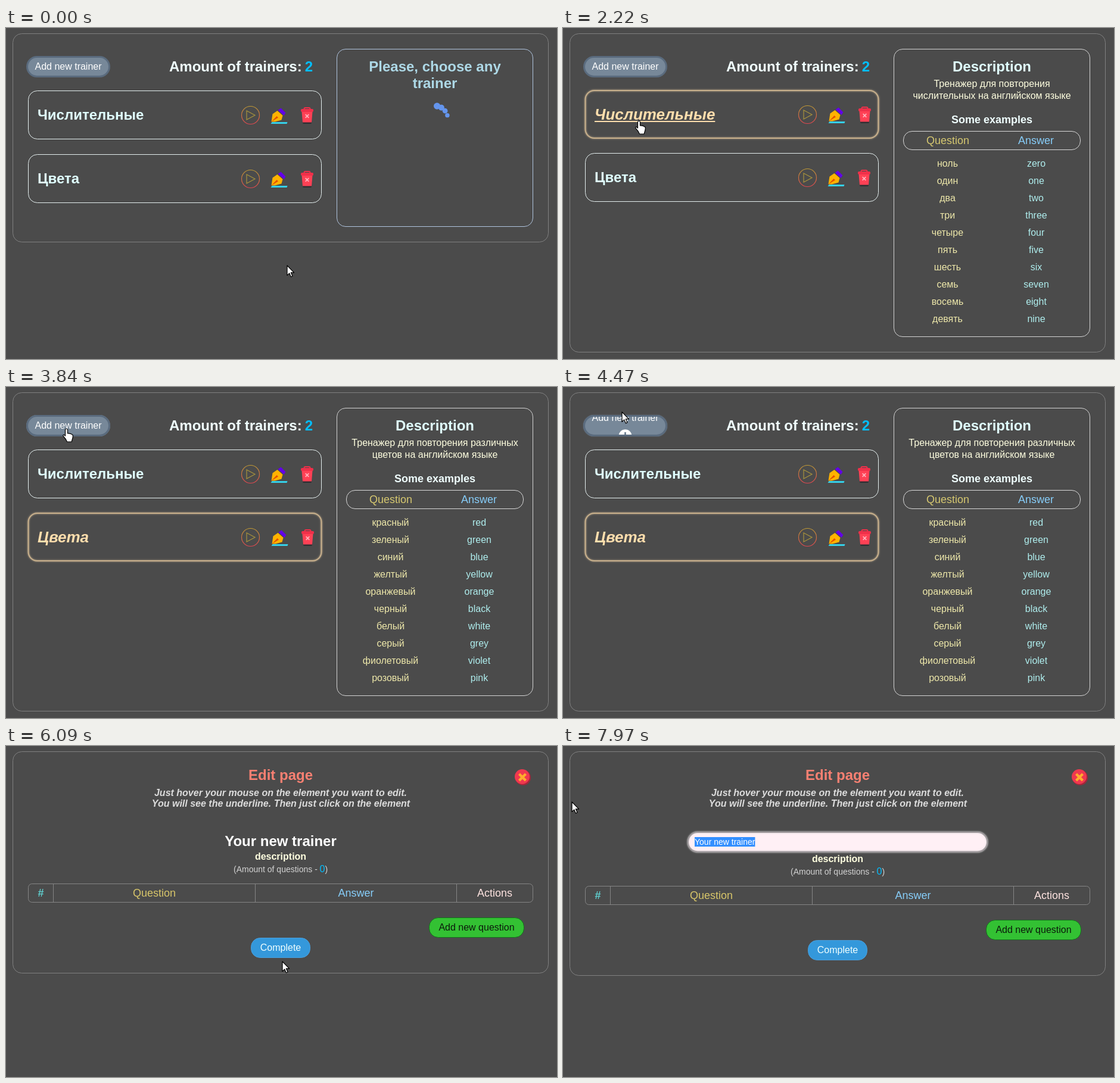
Write an HTML page with a canvas that moves like this. It is 925 px wide and 556 px high and loops after 8 s.

```html
<!DOCTYPE html>
<html lang="en">
<head>
<meta charset="utf-8">
<title>Trainers</title>
<style>
html, body { margin: 0; width: 100%; height: 100%; overflow: hidden; background: #4b4b4b; }
canvas { display: block; }
</style>
</head>
<body>
<canvas id="stage" width="925" height="556"></canvas>
<script>
const g = document.getElementById('stage').getContext('2d');
const LOOP = 8000, STEP = 1000 / 12, TAU = Math.PI * 2;
const CLICK = { first: 2040, second: 3310, add: 4840, edit: 6090, rename: 7240 };

// Pointer moves; it rests between them
const START = { x: 472, y: 399 };
const MOVES = [
  { from: 0, to: 840, x: 461, y: 397 },
  { from: 840, to: 1583, x: 285, y: 341 },
  { from: 1583, to: 2000, x: 127, y: 156 },
  { from: 2400, to: 2833, x: 112, y: 232 },
  { from: 3480, to: 3833, x: 101, y: 70 },
  { from: 3833, to: 4083, x: 98, y: 28 },
  { from: 4250, to: 4640, x: 101, y: 62 },
  { from: 5000, to: 5167, x: 187, y: 182 },
  { from: 5167, to: 5800, x: 464, y: 362 },
  { from: 6083, to: 6800, x: 469, y: 165 },
  { from: 7240, to: 7900, x: 15, y: 94 }
];

const TOPICS = [
  { about: ['Тренажер для повторения', 'числительных на английском языке'],
    ask: 'ноль один два три четыре пять шесть семь восемь девять',
    reply: 'zero one two three four five six seven eight nine' },
  { about: ['Тренажер для повторения различных', 'цветов на английском языке'],
    ask: 'красный зеленый синий желтый оранжевый черный белый серый фиолетовый розовый',
    reply: 'red green blue yellow orange black white grey violet pink' }
];
const TITLES = ['Числительные', 'Цвета', 'Your new trainer'];

const ARROW = new Path2D('M0 0v16.5l3.8-3.6 2.6 6 2.6-1.2-2.6-5.8h5.2z');
const HAND = new Path2D('M-1.5 1.5q2-3 4 0v6.5q4-.5 8 2 1.3 1 .6 5l-2 7h-7.6q-2-5-6.4-9.5-.8-2 1-2.4l2.4 2z');
const BEAM = new Path2D('M-3-8q3 0 3 2 0-2 3-2M0-6v12M-3 8q3 0 3-2 0 2 3 2');

const clamp = v => Math.min(1, Math.max(0, v));
const soften = u => (u + u * u * (3 - 2 * u)) / 2;

function pointerAt(t) {
  let { x, y } = START;
  for (const m of MOVES) {
    const f = soften(clamp((t - m.from) / (m.to - m.from)));
    x += (m.x - x) * f;
    y += (m.y - y) * f;
  }
  return [x, y];
}

// How far the button label has rolled to the plus
function rollAt(t) {
  const hover = (enter, leave) => clamp((t - enter) / 300) - clamp((t - leave) / 300);
  return hover(3833, 3960) + hover(4290, 5080);
}

function font(size, style = '') {
  g.font = `${style} ${size}px "Liberation Sans", Arial, sans-serif`;
}

function text(str, x, y, size, color, style = '', align = 'center') {
  font(size, style);
  g.textAlign = align;
  g.fillStyle = color;
  g.fillText(str, x, y);
}

function underline(str, x, y) {
  g.fillRect(x, y, g.measureText(str).width, 2);
}

function box(x, y, r, b, radius, stroke, fill, width = 1) {
  g.beginPath();
  g.roundRect(x, y, r - x, b - y, radius);
  if (fill) { g.fillStyle = fill; g.fill(); }
  if (stroke) { g.strokeStyle = stroke; g.lineWidth = width; g.stroke(); }
}

function shape(path, color) {
  g.fillStyle = color;
  g.fill(new Path2D(path));
}

function disc(x, y, r, color) {
  g.fillStyle = color;
  g.beginPath();
  g.arc(x, y, r, 0, TAU);
  g.fill();
}

function cross(x, y, arm, width, color, turn = 0) {
  g.save();
  g.translate(x, y);
  g.rotate(turn);
  g.fillStyle = color;
  g.fillRect(-arm, -width / 2, arm * 2, width);
  g.fillRect(-width / 2, -arm, width, arm * 2);
  g.restore();
}

function glow(color, blur) {
  g.shadowColor = color;
  g.shadowBlur = blur;
}

function playIcon(x, y) {
  const ramp = g.createLinearGradient(x, y - 15, x, y + 15);
  ramp.addColorStop(0, '#c09a35');
  ramp.addColorStop(1, '#dc4650');
  g.strokeStyle = ramp;
  g.lineWidth = 1.2;
  g.beginPath();
  g.arc(x, y, 15, 0, TAU);
  g.stroke();
  g.strokeStyle = '#a9943c';
  g.stroke(new Path2D(`M${x - 6.5} ${y - 7.5}l14 7.5-14 7.5z`));
}

function penIcon(x, y) {
  g.save();
  g.translate(x, y);
  shape('M-2-8.5l5-3.5 8 8-3 4.5z', '#6200ea');
  shape('M-13 11l2-13 8-5.5 9 8-2 7.5-11 3z', '#ffb300');
  shape('M-13 11l9-9.5 2.5 2.5z', '#e65100');
  shape('M-14 14.5l2-3h26l-1 3z', '#35d0e8');
  g.restore();
}

function binIcon(x, y) {
  g.save();
  g.translate(x, y);
  box(-7.5, 10, 7.5, 14.5, 2, null, '#2f2f33');
  box(-5, -12.5, 5, -8, 2, '#f0304a', null, 2);
  shape('M-9-6h18l-1.5 18h-15z', '#ff4155');
  box(-10.5, -10.5, 10.5, -5.5, 2, null, '#f0304a');
  cross(0, 1.5, 4, 1.7, '#ffb3bd', Math.PI / 4);
  g.restore();
}

function spinner(t) {
  // Cubic Bezier ease (.5, 0, .5, 1), solved by bisection
  const ease = u => {
    let lo = 0, hi = 1;
    for (let i = 0; i < 20; i++) {
      const s = (lo + hi) / 2;
      if (1.5 * s * (1 - s) + s ** 3 < u) lo = s; else hi = s;
    }
    return lo * lo * (3 - 2 * lo);
  };
  for (let i = 0; i < 4; i++) {
    const a = (160 / 360 + ease((t / 1000 + .413 + i * .031) % 1)) * TAU;
    disc(720 + 21.7 * Math.cos(a), 152.5 + 21.7 * Math.sin(a), 5.6 - i * .63, '#6495ed');
  }
}

function card(title, y, h, selected, hover) {
  const d = selected ? 1 : 0;
  if (selected) {
    glow('rgba(255, 222, 173, .7)', 3);
    box(37.5, y, 529.5, y + h, 15, '#c8b08c', null, 2);
    glow('transparent', 0);
    text(title, 53, y + 49, 26, '#ffdead', 'italic bold', 'left');
  } else {
    box(37.5, y + .5, 529.5, y + h - .5, 15, '#e4eeee');
    text(title, 53, y + 49, 24, '#e0ffff', 'bold', 'left');
  }
  if (hover) underline(title, 53, y + 51);
  const mid = y + 41.5 - d;
  playIcon(410.5, mid);
  penIcon(458.5 + d, mid);
  binIcon(505.5 + d, mid);
}

function addButton(roll) {
  glow('#778899', 3 * roll);
  box(35.5, 48.5, 173.5, 81.5, 16.5, '#5a6b7e', '#778899', 3);
  glow('transparent', 0);
  g.save();
  g.beginPath();
  g.rect(37, 50, 135, 30);
  g.clip();
  text('Add new trainer', 104.5, 70 - 30 * roll, 16, '#fff');
  const y = 65 + 30 * (1 - roll);
  disc(104.5, y, 11, '#fff');
  cross(104.5, y, 6.5, 3, '#778899');
  g.restore();
}

function details(topic) {
  text('Description', 720, 73, 24, '#e0ffff', 'bold');
  topic.about.forEach((line, i) => text(line, 720, 99 + 20 * i, 16, '#ffffe0'));
  text('Some examples', 720, 160, 18, '#f0ffff', 'bold');
  box(571.5, 173.5, 868.5, 204.5, 14.5, '#d8d8d8');
  text('Question', 646, 195, 18, '#d6c870');
  text('Answer', 794, 195, 18, '#87cefa');
  const reply = topic.reply.split(' ');
  topic.ask.split(' ').forEach((word, i) => {
    text(word, 645.5, 233 + 29 * i, 16, '#eee8aa');
    text(reply[i], 794.5, 233 + 29 * i, 16, '#afeeee');
  });
}

function listPage(t, tq, x, y) {
  const chosen = t < CLICK.first ? -1 : t < CLICK.second ? 0 : 1;
  const count = t < CLICK.add ? 2 : 3;
  const idle = chosen < 0;
  let hand = x > 34 && x < 175 && y > 47 && y < 83;
  box(11.5, 9.5, 910.5, idle ? 359.5 : 544.5, 15, '#808080');
  box(555.5, 35.5, 884.5, idle ? 333.5 : 518.5, 14.5, idle ? '#b0c4de' : '#d3d3d3');
  addButton(rollAt(tq));
  text('Amount of trainers:', 274, 73, 24, '#f0ffff', 'bold', 'left');
  text(count, 515, 73, 24, '#00bfff', 'bold', 'right');
  let top = 105;
  for (let i = 0; i < count; i++) {
    const h = i === chosen ? 80 : 82;
    const hover = x > 37 && x < 530 && y >= top && y < top + h;
    card(TITLES[i], top, h, i === chosen, hover);
    hand = hand || hover;
    top += h + 25;
  }
  if (idle) {
    text('Please, choose any', 720, 73, 24, '#add8e6', 'bold');
    text('trainer', 720, 101, 24, '#add8e6', 'bold');
    spinner(tq);
  } else details(TOPICS[chosen]);
  return hand ? HAND : ARROW;
}

function editPage(t, x, y) {
  const typing = t >= CLICK.rename, title = TITLES[2];
  const d = typing ? 4 : 0;
  const onTitle = Math.abs(x - 461) < (typing ? 250 : 97) && y > 146 && y < 177;
  box(11.5, 9.5, 910.5, 381.5 + d, 15, '#808080');
  text('Edit page', 461, 57, 24, '#fa8072', 'bold');
  text('Just hover your mouse on the element you want to edit.', 461, 84, 16, '#dcdcdc', 'italic bold');
  text('You will see the underline. Then just click on the element', 461.5, 102, 16, '#dcdcdc', 'italic bold');
  disc(868, 53, 13, '#a3263a');
  disc(866.5, 51.5, 12.5, '#f0384f');
  cross(867, 52.5, 7.8, 4.2, '#ffab2e', Math.PI / 4);

  if (typing) {
    glow('#ddd', 3);
    box(210, 145, 712, 177.5, 16, '#a09a9d', '#fff0f5', 2);
    glow('transparent', 0);
    font(14);
    g.fillStyle = '#338fff';
    g.fillRect(221, 153, g.measureText(title).width, 16);
    text(title, 221, 166, 14, '#fff', '', 'left');
  } else {
    text(title, 461, 168, 24, '#fff', 'bold');
    if (onTitle) underline(title, 461 - g.measureText(title).width / 2, 170);
  }

  g.save();
  g.translate(0, d);
  text('description', 461, 191, 16, '#ffffe0', 'bold');
  text('(Amount of questions - ', 382, 212, 14, '#d3d3d3', '', 'left');
  text('0', 526.5, 212, 16, '#00bfff', '', 'left');
  text(')', 535.5, 212, 14, '#d3d3d3', '', 'left');
  box(37.5, 231.5, 884.5, 262.5, 6, '#858585');
  g.fillStyle = '#858585';
  for (const x of [79, 418, 756]) g.fillRect(x, 232, 1, 30);
  text('#', 58.5, 253, 18, '#5fcdcd', 'bold');
  text('Question', 249, 253, 18, '#d8c66a');
  text('Answer', 587.5, 253, 18, '#87cefa');
  text('Actions', 820.5, 253, 18, '#ffe4e1');
  box(710.5, 288.5, 869.5, 321.5, 15, '#14701c', '#33c133');
  text('Add new question', 790, 310, 16, '#0c1a0c');
  box(411.5, 322.5, 510.5, 355.5, 15, '#4a9fdc', '#3498db');
  text('Complete', 461, 344, 16, '#f0ffff');
  g.restore();

  const onComplete = Math.abs(x - 461) < 50 && y > 322 + d && y < 356 + d;
  return onTitle ? BEAM : onComplete ? HAND : ARROW;
}

function pointer(path, x, y) {
  g.save();
  g.translate(Math.round(x), Math.round(y));
  g.lineJoin = 'round';
  g.strokeStyle = '#000';
  g.lineWidth = 1.2;
  if (path !== BEAM) {
    g.fillStyle = '#fff';
    g.fill(path);
  }
  g.stroke(path);
  g.restore();
}

function draw(now) {
  const t = now % LOOP;
  // Pointer and spinner advance twelve times a second
  const tq = Math.floor((t + 20) / STEP) * STEP % LOOP;
  const [x, y] = pointerAt(tq);
  g.fillStyle = '#4b4b4b';
  g.fillRect(0, 0, 925, 556);
  const path = t < CLICK.edit ? listPage(t, tq, x, y) : editPage(t, x, y);
  pointer(path, x, y);
  requestAnimationFrame(draw);
}
requestAnimationFrame(draw);
</script>
</body>
</html>
```
